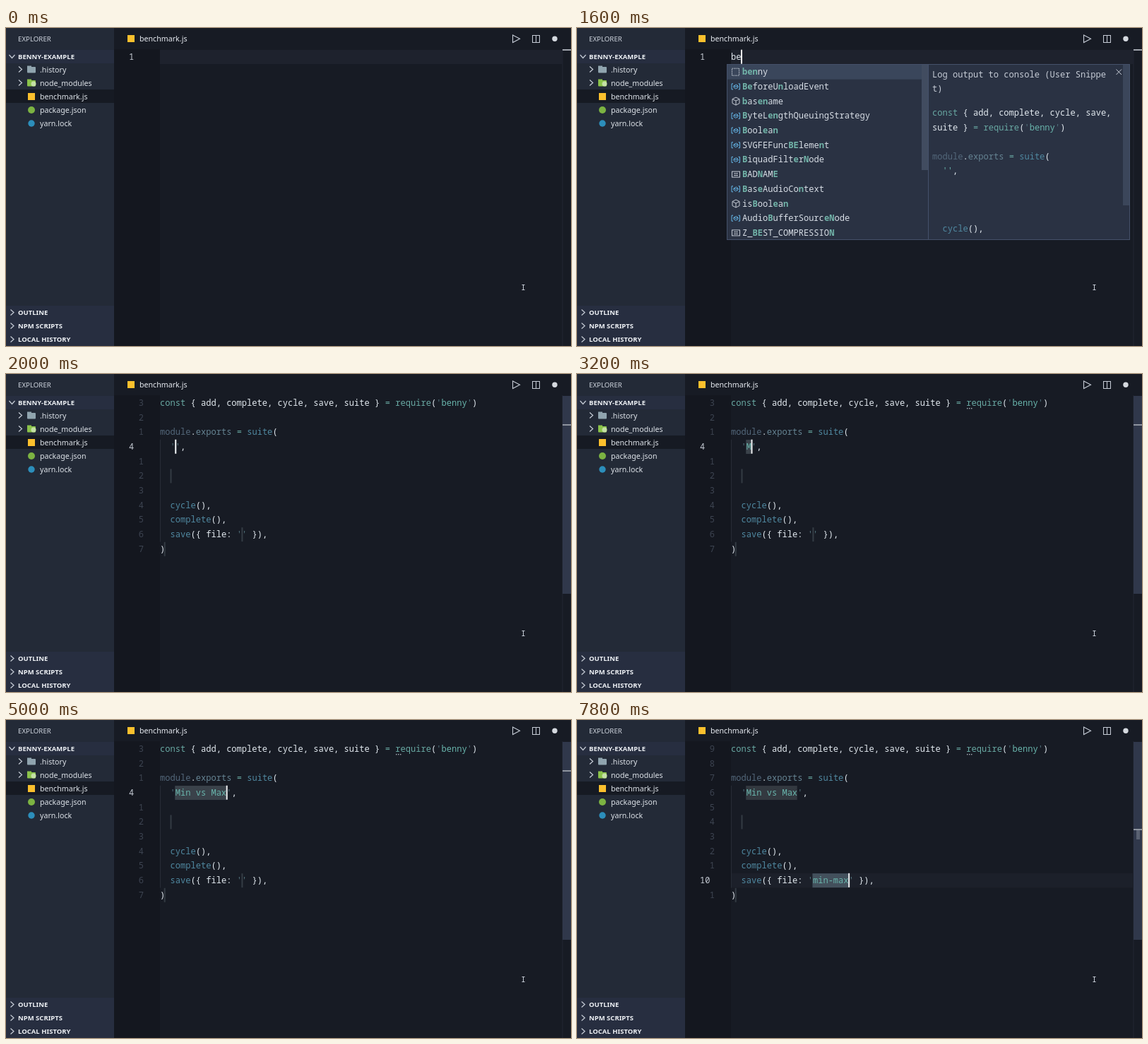
Write an HTML page with a canvas that moves like this. It is 800x450 px and loops after 8 s.

```html
<!DOCTYPE html>
<html lang="en">
<head>
<meta charset="utf-8">
<style>
  html, body { margin: 0; width: 100%; height: 100%; overflow: hidden; background: #171b24; }
  canvas { display: block; width: 800px; height: 450px; }
</style>
</head>
<body>
<canvas width="800" height="450"></canvas>
<script>
const ctx = document.querySelector('canvas').getContext('2d');
const LOOP = 8000, CHAR = 7.245, ROW = 20.68, CODE_X = 218;
const MONO = '12.07px "Noto Sans Mono", monospace';
const MONO_BOLD = 'bold ' + MONO;
const UI = '10.65px "Noto Sans", sans-serif';
const UI_SMALL = '9.7px "Noto Sans", sans-serif';
const UI_BOLD = 'bold 9.5px "Noto Sans", sans-serif';
const WHITE = '#e2e9ef', TEAL = '#69a9a3', BLUE = '#5089a1', DIM = '#53677a',
      PROP = '#668493', STRING = '#69b5ac', QUOTE = '#557781', ICON = '#c6ccd6';

const rect = (x, y, w, h, color) => { ctx.fillStyle = color; ctx.fillRect(x, y, w, h); };
const frame = (x, y, w, h, color) => { ctx.strokeStyle = color; ctx.lineWidth = 1; ctx.strokeRect(x, y, w, h); };

function text(str, x, y, font, color, align = 'left') {
  ctx.font = font;
  ctx.fillStyle = color;
  ctx.textAlign = align;
  ctx.fillText(str, x, y);
}

function dot(x, y, r, color) {
  ctx.fillStyle = color;
  ctx.beginPath();
  ctx.arc(x, y, r, 0, 7);
  ctx.fill();
}

function line(points, color, width = 1, close = false) {
  ctx.strokeStyle = color;
  ctx.lineWidth = width;
  ctx.beginPath();
  points.forEach(([x, y]) => ctx.lineTo(x, y));
  if (close) ctx.closePath();
  ctx.stroke();
}

// Draws [color, text] segments on one monospaced line.
function code(x, y, ...segments) {
  for (const [color, str] of segments) {
    text(str, x, y, MONO, color);
    x += str.length * CHAR;
  }
}

const baseline = row => 45 + row * ROW;
const rowTop = row => 30.7 + row * ROW;

// Value of the last [time, value] entry already reached.
const at = (t, steps, start) => steps.reduce((v, [time, next]) => t >= time ? next : v, start);

function folder(x, y, color) {
  rect(x, y, 6, 3, color);
  ctx.fillStyle = color;
  ctx.beginPath();
  ctx.roundRect(x, y + 1.5, 12, 8.5, 1);
  ctx.fill();
}

const chevron = (x, y) => line([[x, y - 4], [x + 4.5, y], [x, y + 4]], ICON, 1.2);

function sidebar() {
  rect(0, 0, 153, 450, '#232a37');
  text('EXPLORER', 17, 18.5, UI_SMALL, '#d0d6df');
  rect(0, 31, 153, 19, '#272e40');
  line([[4.5, 38], [8.5, 42.5], [12.5, 38]], ICON, 1.2);
  text('BENNY-EXAMPLE', 17, 43.5, UI_BOLD, '#eef1f5');
  rect(0, 87, 153, 19, '#161a23');

  ['.history', 'node_modules', 'benchmark.js', 'package.json', 'yarn.lock'].forEach((name, i) =>
    text(name, 48, 62.5 + i * 19, UI, '#dde2e8'));
  chevron(18, 58.5);
  chevron(18, 77.5);
  folder(30, 53.5, '#90a4ae');
  folder(30, 72.5, '#8bc34a');
  dot(39, 79, 3.5, '#c5e1a5');
  rect(31, 92, 10, 10, '#fbc02d');
  dot(36, 116, 5, '#7cb342');
  dot(36, 135, 4.7, '#2c8ebb');

  rect(0, 393, 153, 57, '#272e40');
  ['OUTLINE', 'NPM SCRIPTS', 'LOCAL HISTORY'].forEach((name, i) => {
    chevron(6.5, 402.5 + i * 19);
    text(name, 17, 406 + i * 19, UI_BOLD, '#eef1f5');
  });
}

function titleBar() {
  rect(172, 10, 10, 10, '#fbc02d');
  text('benchmark.js', 189, 18.7, UI, '#e6eaf0');
  line([[717.5, 10], [727.5, 15.3], [717.5, 20.5]], ICON, 1.1, true);
  frame(745.5, 10.5, 10, 10, ICON);
  line([[750.5, 10], [750.5, 21]], ICON);
  dot(777, 15.3, 3.7, '#d5d9df');
}

function lineNumbers(count, current) {
  for (let i = 0; i < count; i++) {
    if (i === current) text(i + 1, 174, baseline(i), MONO, '#c3c9d2');
    else text(Math.abs(i - current), 195, baseline(i), MONO, '#3d4451', 'right');
  }
}

const caret = (x, row) => rect(x, rowTop(row), 2, 20, '#f1f3f5');

function firstLine(typed, showCaret) {
  rect(CODE_X, 31, 570, 20, '#1e222d');
  rect(788, 30, 12, 2, '#a0a5ad');
  lineNumbers(1, 0);
  code(CODE_X, baseline(0), [WHITE, typed]);
  if (showCaret) caret(CODE_X - .5 + typed.length * CHAR, 0);
}

const IMPORT = [[TEAL, 'const'], [WHITE, ' { add, complete, cycle, save, suite } '], [TEAL, '= require'],
  [WHITE, '('], [QUOTE, "'"], [STRING, 'benny'], [QUOTE, "'"], [WHITE, ')']];
const EXPORT = [[DIM, 'module'], [WHITE, '.'], [PROP, 'exports'], [TEAL, ' = '], [BLUE, 'suite'], [WHITE, '(']];

function snippet(t) {
  const title = 'Min vs Max'.slice(0, at(t, [[3200, 1], [3400, 2], [3600, 3], [3800, 4], [4000, 6],
    [4200, 7], [4600, 8], [4800, 9], [5000, 10]], 0));
  const file = 'min-max'.slice(0, at(t, [[6400, 1], [6600, 2], [6800, 3], [7000, 4], [7200, 6], [7400, 7]], 0));
  const current = t < 5400 ? 3 : 9;
  const caretOff = (t >= 2500 && t < 3000) || (t >= 5900 && t < 6400) || t >= 7900;
  const titleX = CODE_X + 3 * CHAR, fileX = CODE_X + 16 * CHAR;

  if (current === 9) rect(CODE_X, rowTop(9), 570, 20.5, '#1c202a');
  rect(788, 31, 12, 280, '#30384b');
  rect(788, current === 3 ? 71 : 154, 12, 2, '#8e949f');
  if (t >= 7800) rect(792, 156, 5, 13, '#596171');
  lineNumbers(11, current);
  rect(218, rowTop(3), 1, ROW * 7, '#272c36');

  const stop = (x, row, width, color = '#343b43') => rect(x, rowTop(row) + .3, Math.max(2, width), 20, color);
  stop(titleX - .5, 3, title.length * CHAR, current === 3 ? '#3a424a' : '#333940');
  stop(232.5, 5, 0);
  stop(fileX - .5, 9, file.length * CHAR, t >= 7800 ? '#43505c' : '#353d45');
  stop(223.7, 10, 0);

  const rows = {
    0: IMPORT,
    2: EXPORT,
    3: [[QUOTE, "  '"], [STRING, title], [QUOTE, "'"], [WHITE, ',']],
    7: [[BLUE, '  cycle'], [WHITE, '(),']],
    8: [[BLUE, '  complete'], [WHITE, '(),']],
    9: [[BLUE, '  save'], [WHITE, '({ file: '], [QUOTE, "'"], [STRING, file], [QUOTE, "'"], [WHITE, ' }),']],
    10: [[WHITE, ')']],
  };
  for (const row in rows) code(CODE_X, baseline(+row), ...rows[row]);
  if (t >= 2400) for (let i = 0; i < 3; i++) rect(552 + i * 3, 48, 1.4, 1.4, '#b0b6bf');
  if (!caretOff) {
    if (current === 3) caret(titleX - .5 + title.length * CHAR, 3);
    else caret(fileX - .5 + file.length * CHAR, 9);
  }
}

// Icon kind, then the label; matched letters are in brackets.
const SUGGESTIONS = ['s [ben]ny', 'v [Be]foreU[n]loadEvent', 'm [b]as[en]ame', 'v [B]yteL[en]gthQueuingStrategy',
  'v [B]ool[e]a[n]', 'v SVGFEFunc[BE]leme[n]t', 'v [B]iquadFilt[e]r[N]ode', 'c [B]AD[N]AM[E]',
  'v [B]as[e]AudioCo[n]text', 'm is[B]ool[e]a[n]', 'v Audio[B]ufferSourc[eN]ode', 'c Z_[BE]ST_COMPRESSIO[N]'];

function suggestionIcon(kind, y) {
  if (kind === 's') {
    ctx.setLineDash([1.5, 1]);
    frame(219.5, y - 5, 10, 10, ICON);
    ctx.setLineDash([]);
  } else if (kind === 'c') {
    frame(219.5, y - 4, 11, 8, ICON);
    line([[222, y - 1.2], [228, y - 1.2]], ICON);
    line([[222, y + 1.5], [228, y + 1.5]], ICON);
  } else if (kind === 'm') {
    line([[225, y - 5.5], [230, y - 3], [230, y + 3], [225, y + 5.5], [220, y + 3], [220, y - 3]], ICON, 1, true);
    line([[220, y - 3], [225, y - .5], [230, y - 3]], ICON);
    line([[225, y - .5], [225, y + 5.5]], ICON);
  } else {
    const color = '#65b5e6';
    line([[221, y - 4], [219, y - 4], [219, y + 4], [221, y + 4]], color);
    line([[228.5, y - 4], [230.5, y - 4], [230.5, y + 4], [228.5, y + 4]], color);
    line([[222, y - 1], [225.5, y - 2.7], [228, y - 1], [228, y + 1.3], [224.5, y + 3], [222, y + 1.3]], color, 1, true);
    line([[222, y - 1], [224.5, y + .3], [228, y - 1]], color);
  }
}

function suggestionList() {
  rect(213, 52, 284, 247, '#2a3243');
  rect(213, 52, 284, 20.7, '#3a465b');
  rect(488, 52, 9, 149, '#414c60');
  SUGGESTIONS.forEach((entry, i) => {
    const y = 62.2 + i * 20.7;
    let x = 234;
    suggestionIcon(entry[0], y);
    entry.slice(2).split(/[[\]]/).forEach((part, k) => {
      text(part, x, y + 4, k % 2 ? MONO_BOLD : MONO, k % 2 ? '#72b5aa' : '#d8dee6');
      x += part.length * CHAR;
    });
  });
  frame(212.5, 51.5, 285, 248, '#45516a');
}

function suggestionDetails() {
  const x = 503;
  rect(498, 52, 285, 247, '#2a3243');
  rect(773, 52, 10, 199, '#3b465a');
  ctx.save();
  ctx.beginPath();
  ctx.rect(498, 52, 285, 247);
  ctx.clip();
  code(x, 69.5, [ICON, 'Log output to console (User Snippe']);
  code(x, 90, [ICON, 't)']);
  code(x, 124.3, [TEAL, 'const'], [WHITE, ' { add, complete, cycle, save,']);
  code(x, 144.8, [WHITE, 'suite } '], [TEAL, '= require'], [WHITE, '('], [QUOTE, "'"],
    [STRING, 'benny'], [QUOTE, "'"], [WHITE, ')']);
  code(x, 185.7, ...EXPORT);
  code(x, 206, [STRING, "  ''"], [WHITE, ',']);
  code(x, 288, [BLUE, '  cycle'], [WHITE, '(),']);
  code(x, 308.5, [BLUE, '  complete'], [WHITE, '(),']);
  ctx.restore();
  line([[763.5, 58.5], [771, 66]], ICON);
  line([[771, 58.5], [763.5, 66]], ICON);
  frame(497.5, 51.5, 285, 248, '#45516a');
}

function pointer() {
  line([[730.5, 363.5], [734.5, 363.5]], ICON);
  line([[732.5, 363.5], [732.5, 370.5]], ICON);
  line([[730.5, 370.5], [734.5, 370.5]], ICON);
}

function draw(now) {
  const t = now % LOOP;
  rect(0, 0, 800, 450, '#171b24');
  rect(153, 30, 65, 420, '#14171f');
  rect(787.5, 30, 1, 420, '#222732');
  sidebar();
  titleBar();
  if (t < 2000) {
    const typed = 'ben'.slice(0, at(t, [[1400, 1], [1600, 2], [1800, 3]], 0));
    firstLine(typed, t >= 1400 || (t >= 400 && t < 900));
    if (t >= 1600) {
      suggestionList();
      suggestionDetails();
    }
  } else {
    snippet(t);
  }
  pointer();
}

const start = performance.now();
function tick() {
  draw(performance.now() - start);
  requestAnimationFrame(tick);
}
tick();
</script>
</body>
</html>
```
